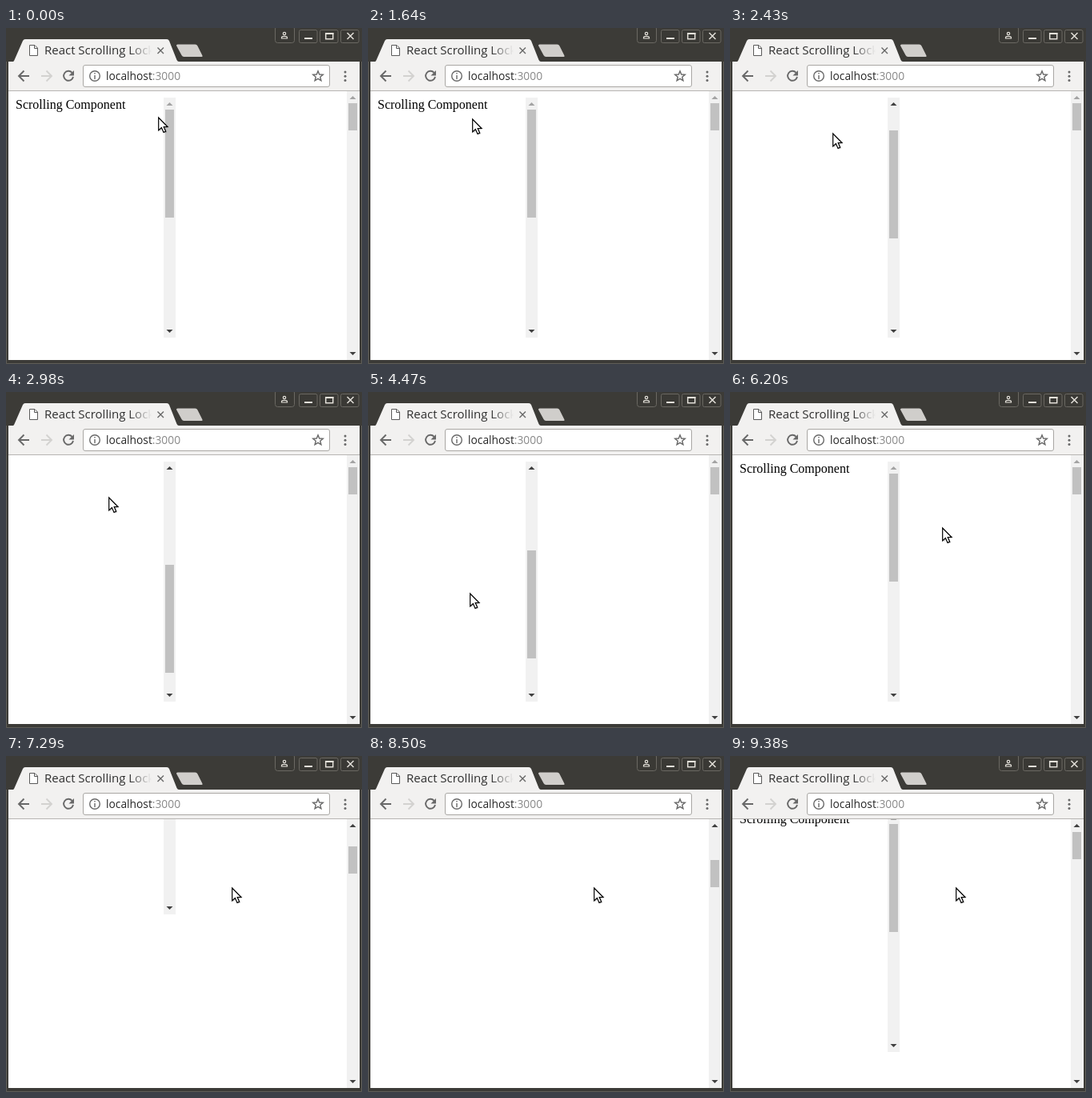
An HTML page for the animation above (9.48 s loop, 445 by 420 pixels).

```html
<!DOCTYPE html>
<html lang="en">
<head>
<meta charset="utf-8">
<title>React Scrolling Lock</title>
<style>
html, body { margin: 0; width: 100%; height: 100%; overflow: hidden; background: #3c3b37; }
svg { display: block; width: 445px; height: 420px; }
.ui { font-family: "Open Sans", "Noto Sans", sans-serif; }
.page { font: 16px "Liberation Serif", "Times New Roman", serif; }
.line { fill: none; stroke: #686868; stroke-width: 1.9; }
.thin { stroke-width: 1.4; }
.off { stroke: #d3d2d0; }
.btn { fill: #3a3935; stroke: #6b6963; }
.glyph { fill: none; stroke: #e4e1da; stroke-width: 1.5; }
</style>
</head>
<body>
<svg viewBox="0 0 445 420">
  <defs>
    <linearGradient id="fade" gradientUnits="userSpaceOnUse" x1="154" y1="0" x2="182" y2="0">
      <stop offset="0" stop-color="#2e2e2e"/>
      <stop offset="1" stop-color="#2e2e2e" stop-opacity="0"/>
    </linearGradient>
    <clipPath id="view"><rect x="3" y="79" width="439" height="336"/></clipPath>
    <clipPath id="box"><rect x="12" y="87" width="185" height="300"/></clipPath>
  </defs>

  <!-- title bar -->
  <rect width="445" height="420" fill="#3c3b37"/>
  <path d="M.5 42V419.5H444.5V42" fill="none" stroke="#5f5d58"/>
  <rect class="btn" x="336.500" y="-2" width="24" height="20.500" rx="3"/>
  <g id="buttons"></g>
  <g class="glyph">
    <circle cx="348" cy="7" r="1.700" stroke-width="1.200"/>
    <path d="M344.500 13V12Q344.500 10.300 348 10.300T351.500 12V13Z" stroke-width="1.200"/>
    <path d="M373 13H383" stroke-width="2"/>
    <rect x="399.700" y="6.700" width="9" height="7"/>
    <path d="M399 7H409.500" stroke-width="2"/>
    <path d="M426.500 6L434.500 14M434.500 6L426.500 14"/>
  </g>

  <!-- tabs and toolbar -->
  <path d="M3 42H9Q10 41.500 10.500 40L21 16Q22 14 24 14H201Q203 14 204 16L213.500 40Q214.500 42 216 42H442V79H3Z" fill="#f2f1f0"/>
  <path d="M214.500 20.500H236.500Q238.500 20.500 239.500 22.500L245.500 34.500Q246 36 244.500 36H222.500Q220.500 36 219.500 34L213 22Q212.700 20.500 214.500 20.500Z" fill="#d0cecb"/>
  <path d="M3 78.500H442" stroke="#b7b5b2"/>
  <path d="M29.500 21.500H36L39.500 25V34.500H29.500ZM35.500 21.500V25.500H39.500" fill="#fff" stroke="#5a5a5a"/>
  <text class="ui" x="48" y="33" font-size="15" fill="url(#fade)">React Scrolling Lock</text>
  <path class="line thin" d="M189.500 24.500L197 32M197 24.500L189.500 32"/>
  <path class="line" d="M29 60H16M22.500 53.500L16 60L22.500 66.500"/>
  <path class="line off" d="M44 60H57M50.500 53.500L57 60L50.500 66.500"/>
  <path class="line" d="M82.600 55.800A6 6 0 1 0 84 61"/>
  <path d="M85 53V59.500H78.500Z" fill="#686868"/>
  <rect x="96.500" y="46.500" width="308" height="27" rx="2.500" fill="#fff" stroke="#a9a7a4"/>
  <circle class="line thin" cx="111" cy="60" r="6.300"/>
  <path class="line thin" d="M111 59V64M111 56V57.600"/>
  <text class="ui" x="125" y="65" font-size="13.800" fill="#262626">localhost<tspan fill="#888">:3000</tspan></text>
  <path id="star" class="line thin"/>
  <g id="dots" fill="#686868"></g>

  <!-- page -->
  <rect x="3" y="79" width="439" height="336" fill="#fff"/>
  <g clip-path="url(#view)">
    <g id="doc">
      <g clip-path="url(#box)"><text class="page" id="label" x="12" y="101">Scrolling Component</text></g>
      <g id="inner"></g>
    </g>
    <g id="outer"></g>
  </g>
  <g id="cursor">
    <path d="M2 3V18.500L5 15.500L8 20.500L11 19.500L9 14H13Z" opacity=".2"/>
    <path d="M.700 1V17L4.400 13.600L7 19.400L9.700 18.200L7.200 12.500H12Z" fill="#fff" stroke="#000" stroke-width="1.200"/>
  </g>
</svg>
<script>
const LOOP = 9480, STEP = 40, NOTCH = 53;
const $ = id => document.getElementById(id);

function add(host, tag, attrs) {
  const el = document.createElementNS("http://www.w3.org/2000/svg", tag);
  for (const k in attrs) el.setAttribute(k, attrs[k]);
  return host.appendChild(el);
}

// Wheel turns: start, notches, steps
const innerWheel = [[1980, 1, 5], [2430, 2, 7], [2820, 3, 8], [4310, -2, 7], [4700, -2, 6], [5020, -2, 7]];
const outerWheel = [[6530, 1, 6], [6900, 1, 6], [7210, 4, 7], [7650, 3, 6],
                    [8380, -3, 6], [8850, -3, 6], [9180, -3, 7.5]];

// Pointer: start, steps, two Bezier controls, end
const home = [190, 111];
const strokes = [
  [50, 4, [150, 111], [130, 111], [130, 111]],
  [1640, 3, [130, 111], [130, 118], [128, 131]],
  [3520, 2, [128, 134], [128, 138], [128, 141]],
  [3830, 9, [122, 175], [125, 230], [127, 251]],
  [5800, 14, [160, -70], [276, 238], [282, 164]]
];

const progress = (t, start, steps) =>
  t < start ? 0 : Math.min(1, (Math.floor((t - start) / STEP) + 1) / steps);

function scrollAt(wheel, max, t) {
  return Math.round(wheel.reduce((pos, [start, notches, steps]) => {
    const goal = Math.max(0, Math.min(max, pos + notches * NOTCH));
    const p = progress(t, start, steps);
    return p ? pos + (goal - pos) * p * p * (3 - 2 * p) : pos;
  }, 0));
}

function cursorAt(t) {
  return strokes.reduce((from, [start, steps, c1, c2, end]) => {
    const u = progress(t, start, steps), v = 1 - u;
    return u ? from.map((a, i) =>
      a * v ** 3 + 3 * c1[i] * v * v * u + 3 * c2[i] * v * u * u + end[i] * u ** 3) : from;
  }, home).map(Math.round);
}

function scrollbar(host, x, top, height, thumb, scale, max) {
  const bottom = top + height, left = x + 3.5;
  add(host, "rect", { x, y: top, width: 15, height, fill: "#f1f1f1" });
  const bar = add(host, "rect", { x: x + 2, width: 11, height: thumb, fill: "#c1c1c1" });
  const up = add(host, "path", { d: `M${left} ${top + 10}h8l-4 -4z` });
  const down = add(host, "path", { d: `M${left} ${bottom - 10}h8l-4 4z` });
  const tint = on => on ? "#404040" : "#a3a3a3";
  return pos => {
    bar.setAttribute("y", top + 15 + Math.floor(pos * scale));
    up.setAttribute("fill", tint(pos > 0));
    down.setAttribute("fill", tint(pos < max));
  };
}

for (let i = 0; i < 3; i++) {
  add($("buttons"), "rect", { class: "btn", x: 366.5 + 26 * i, y: 2.5, width: 22.5, height: 16, rx: 2 });
  add($("dots"), "circle", { cx: 424, cy: 55 + 5.3 * i, r: 1.5 });
}
const tips = Array.from({ length: 10 }, (_, i) => {
  const a = i * Math.PI / 5, r = i % 2 ? 2.9 : 6.6;
  return `${390 + r * Math.sin(a)} ${60.4 - r * Math.cos(a)}`;
});
$("star").setAttribute("d", `M${tips.join("L")}Z`);

const INNER_MAX = 300, OUTER_MAX = 2680;
const setInner = scrollbar($("inner"), 197, 87, 300, 135, 0.45, INNER_MAX);
const setOuter = scrollbar($("outer"), 426, 79, 336, 34, 0.102, OUTER_MAX);
const shift = (id, x, y) => $(id).setAttribute("transform", `translate(${x} ${y})`);

function draw(t) {
  const inner = scrollAt(innerWheel, INNER_MAX, t);
  const outer = scrollAt(outerWheel, OUTER_MAX, t);
  shift("label", 0, -inner);
  shift("doc", 0, -outer);
  setInner(inner);
  setOuter(outer);
  shift("cursor", ...cursorAt(t));
}

const begin = performance.now();
function tick() {
  draw((performance.now() - begin) % LOOP);
  requestAnimationFrame(tick);
}
tick();
</script>
</body>
</html>
```
